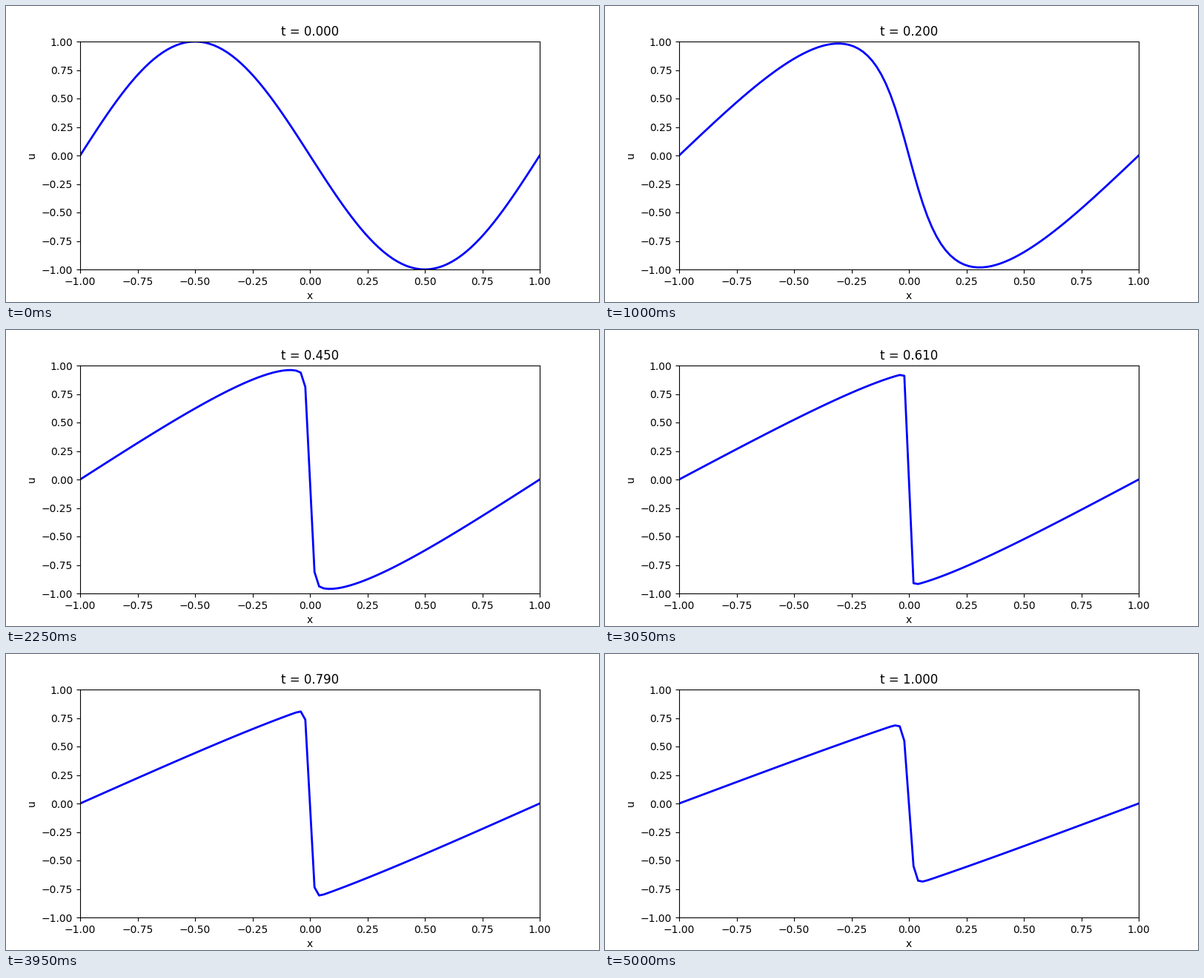
A matplotlib script that plays this animation: 800x400 px, repeating every 5050 ms.

```python
import numpy as np
import matplotlib.pyplot as plt
from matplotlib.animation import FuncAnimation

# Viscous Burgers equation, explicit central differences
NU = 0.03 / np.pi
NX, DT = 101, 0.001
FRAMES, STEPS = 101, 10

x = np.linspace(-1, 1, NX)
dx = x[1] - x[0]


def advance(u):
    new = u.copy()
    mid, left, right = u[1:-1], u[:-2], u[2:]
    slope = (right - left) / (2 * dx)
    bend = (right - 2 * mid + left) / dx**2
    new[1:-1] = mid + DT * (NU * bend - mid * slope)
    new[0] = new[-1] = 0
    return new


def solve():
    u = -np.sin(np.pi * x)
    history = [u]
    for _ in range(FRAMES - 1):
        for _ in range(STEPS):
            u = advance(u)
        history.append(u)
    return history


waves = solve()

fig, ax = plt.subplots(figsize=(8, 4), dpi=100)
line, = ax.plot(x, waves[0], "b-", lw=2)
ax.set(xlim=(-1, 1), ylim=(-1, 1), xlabel="x", ylabel="u")
title = ax.set_title("t = 0.000")


def update(i):
    line.set_ydata(waves[i])
    title.set_text(f"t = {i * STEPS * DT:.3f}")
    return line, title


anim = FuncAnimation(fig, update, frames=FRAMES, interval=50,
                     repeat=True, repeat_delay=0)
plt.show()
```
